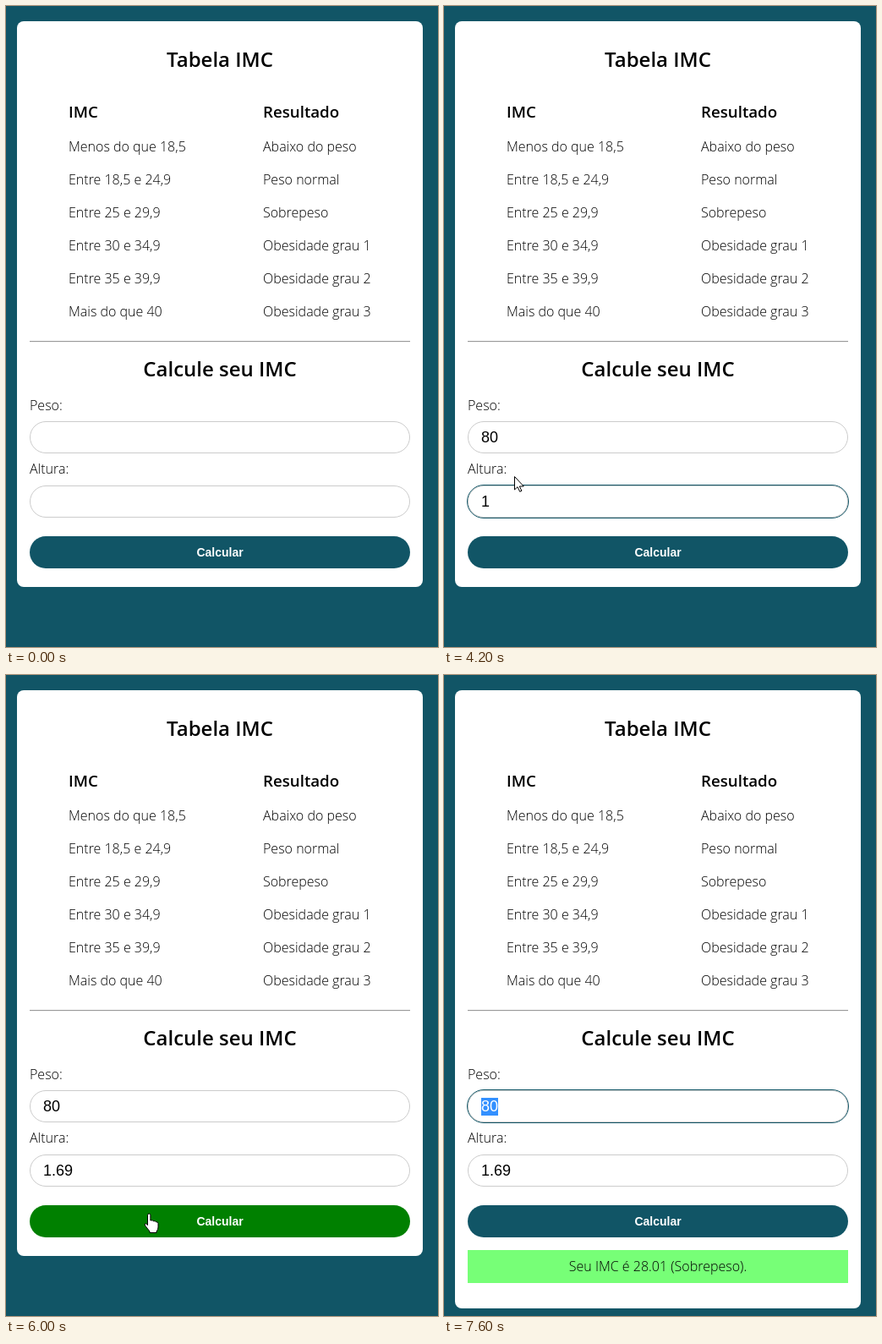
Recreate the animation shown at these times as an HTML page. Size 511x758 px, loop 8 s.

```html
<!DOCTYPE html>
<html lang="pt">
<head>
<meta charset="utf-8">
<title>Tabela IMC</title>
<style>
  html, body { margin: 0; width: 100%; height: 100%; overflow: hidden; background: #156; }
  svg { display: block; width: 511px; height: 758px; font: 300 16px "Open Sans", sans-serif; }
  .title { font-size: 24px; font-weight: 600; text-anchor: middle; }
  .head { font-size: 18.72px; font-weight: 600; }
  .mid { text-anchor: middle; }
  .value { font: 18px "Liberation Sans", Arial, sans-serif; }
  .button { font: bold 14px "Liberation Sans", Arial, sans-serif; fill: #fff; text-anchor: middle; }
  .box { fill: #fff; stroke: #ccc; }
  .ring { fill: none; stroke: #156; }
  .cursor { fill: #fff; stroke: #000; stroke-linejoin: round; }
</style>
</head>
<body>
<svg viewBox="0 0 511 758">
  <rect width="511" height="758" fill="#156"/>
  <rect id="card" x="13" y="18" width="480" height="669" rx="8" fill="#fff"/>
  <text class="title" x="253" y="72">Tabela IMC</text>
  <text class="head" x="74" y="132">IMC</text>
  <text class="head" x="304" y="132">Resultado</text>
  <g id="rows"></g>
  <path d="M28 396.5H478" stroke="#9a9a9a"/>
  <path d="M28 397.5H478" stroke="#eee"/>
  <text class="title" x="253" y="438">Calcule seu IMC</text>
  <text x="28" y="478">Peso:</text>
  <text x="28" y="553">Altura:</text>
  <g id="fields"></g>
  <rect id="button" x="28" y="627" width="450" height="38" rx="19"/>
  <text class="button" x="253" y="651">Calcular</text>
  <g id="result">
    <rect x="28" y="680" width="450" height="39" fill="#7f7"/>
    <text class="mid" x="253" y="705">Seu IMC é 28.01 (Sobrepeso).</text>
  </g>
  <path id="arrow" class="cursor" d="M.5 .5V16L4 12.7 6.7 18.3 8.9 17.3 6.3 12H11.3Z"/>
  <path id="hand" class="cursor" d="M-1.5 13.5V1.7a1.7 1.7 0 0 1 3.4 0V8q3-.8 3.3 .8q3-.6 3.2 1q2.6-.4 2.6 1.8V16q0 3-2 5v1.5H1V21L-4.5 14q-1-2.5 1-2.3z"/>
</svg>
<script>
const $ = id => document.getElementById(id);
const show = (el, on) => el.setAttribute('visibility', on ? 'visible' : 'hidden');

const rows = [
  ['Menos do que 18,5', 'Abaixo do peso'],
  ['Entre 18,5 e 24,9', 'Peso normal'],
  ['Entre 25 e 29,9', 'Sobrepeso'],
  ['Entre 30 e 34,9', 'Obesidade grau 1'],
  ['Entre 35 e 39,9', 'Obesidade grau 2'],
  ['Mais do que 40', 'Obesidade grau 3']
];
$('rows').innerHTML = rows.map(([range, label], i) =>
  `<text x="74" y="${172 + 39 * i}">${range}</text><text x="304" y="${172 + 39 * i}">${label}</text>`).join('');

// Timelines: [start in ms, value...]
const typed = {
  peso: [[0, ''], [2000, '8'], [2100, '80']],
  altura: [[0, ''], [3800, '1'], [4300, '1.'], [4600, '1.6'], [4800, '1.69']]
};
const focus = [[0, ''], [900, 'peso'], [2900, 'altura'], [5900, ''], [7500, 'peso']];
const caretToggles = [900, 1400, 1800, 2500, 2900, 3500, 3800, 4200, 4300, 5300, 5800, 5900, 7500, 7600];
const pointer = [
  [0, ''],
  [100, 'arrow', 461, 0], [200, 'arrow', 310, 212], [300, 'arrow', 155, 428],
  [400, 'arrow', 3, 641], [500, 'arrow', 22, 600], [600, 'arrow', 52, 545], [700, ''],
  [2600, 'arrow', 82, 531], [2700, 'arrow', 83, 547], [2800, ''],
  [3100, 'arrow', 83, 560], [3300, 'arrow', 83, 556],
  [5200, 'arrow', 95, 570], [5300, 'arrow', 109, 587], [5500, 'arrow', 140, 612],
  [5600, 'arrow', 159, 626], [5700, 'hand', 165, 633], [5800, 'hand', 169, 637],
  [6500, 'hand', 178, 631], [6600, 'arrow', 180, 622], [6700, 'arrow', 173, 606],
  [6900, 'arrow', 160, 590], [7000, 'arrow', 135, 566], [7100, 'arrow', 116, 544], [7500, '']
];
const at = (steps, t) => steps.filter(step => step[0] <= t).pop().slice(1);

const fieldTops = { peso: 491, altura: 567 };
$('fields').innerHTML = Object.entries(fieldTops).map(([id, y]) => `
  <rect class="box" x="28.5" y="${y + .5}" width="449" height="37" rx="18.5"/>
  <rect class="ring" id="${id}Ring" x="27.5" y="${y - .5}" width="451" height="39" rx="19.5"/>
  <rect id="${id}Mark" x="44" y="${y + 9}" width="20" height="21" fill="#3390ff"/>
  <text class="value" id="${id}" x="44" y="${y + 25}"></text>
  <rect id="${id}Caret" y="${y + 9}" width="1" height="20"/>`).join('');

function draw(t) {
  const [focused] = at(focus, t);
  const caretOn = caretToggles.filter(time => time <= t).length % 2;
  for (const id in typed) {
    const text = $(id), active = id === focused, marked = active && t >= 7600;
    text.textContent = at(typed[id], t)[0];
    text.setAttribute('fill', marked ? '#fff' : '#000');
    $(id + 'Caret').setAttribute('x', 44 + Math.floor(text.getComputedTextLength()));
    show($(id + 'Caret'), active && caretOn);
    show($(id + 'Ring'), active);
    show($(id + 'Mark'), marked);
  }

  const [shape, x, y] = at(pointer, t);
  for (const id of ['arrow', 'hand']) {
    show($(id), id === shape);
    if (id === shape) $(id).setAttribute('transform', `translate(${x} ${y})`);
  }
  $('button').setAttribute('fill', shape === 'hand' ? 'green' : '#156');

  const done = t >= 6100;
  show($('result'), done);
  $('card').setAttribute('height', done ? 731 : 669);
}

const start = performance.now();
function tick() {
  draw((performance.now() - start) % 8000);
  requestAnimationFrame(tick);
}
tick();
</script>
</body>
</html>
```
